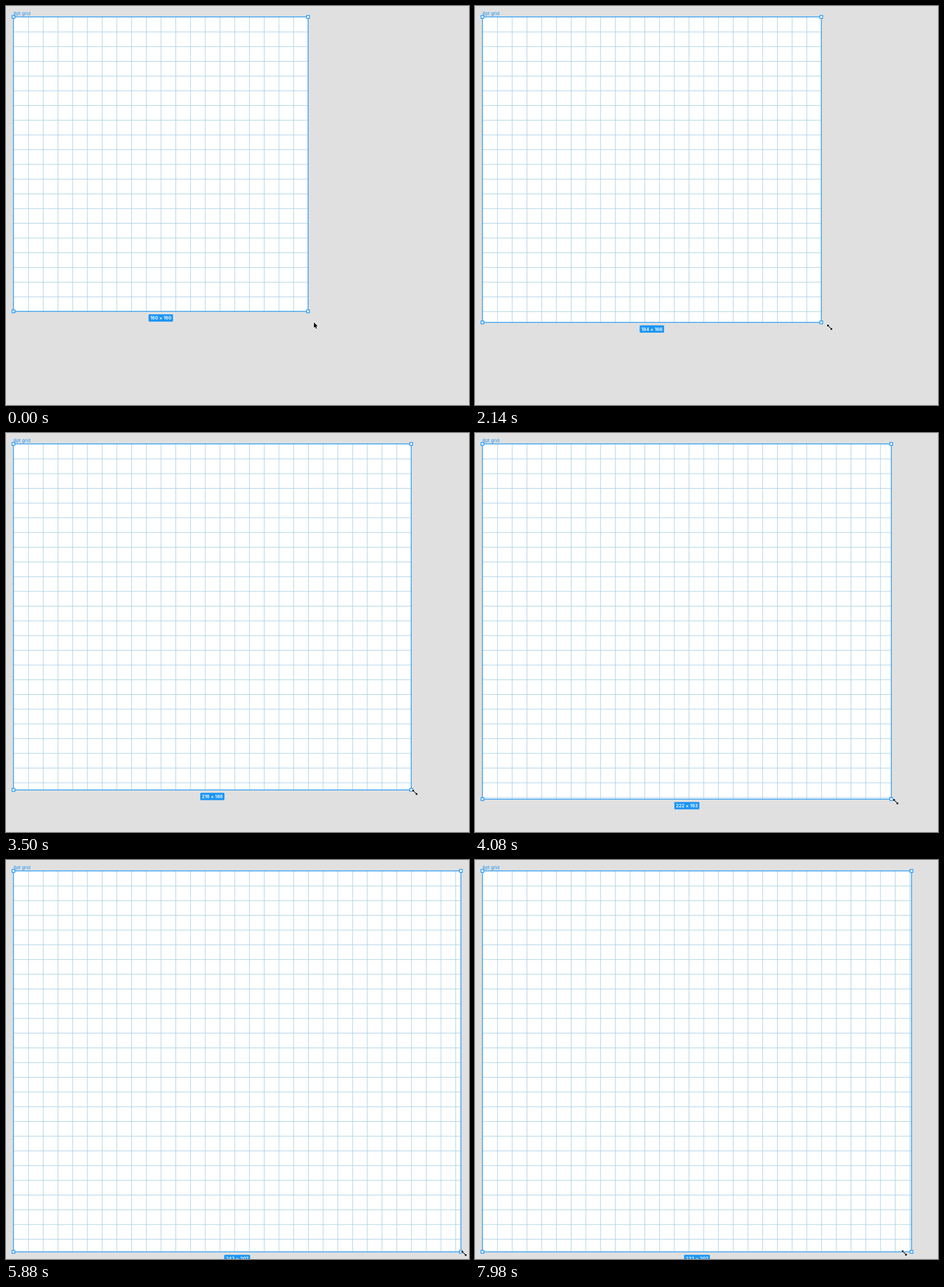
Recreate the animation shown at these times as an HTML page with a canvas. Size 806 px wide and 695 px high, loop 8 s.

```html
<!DOCTYPE html>
<html lang="en">
<head>
<meta charset="utf-8">
<title>Resizing a frame on an 8pt grid</title>
<style>
  html, body { margin: 0; width: 100%; height: 100%; overflow: hidden; background: #e0e0e0; }
  canvas { display: block; width: 806px; height: 695px; }
</style>
</head>
<body>
<canvas id="stage" width="806" height="695"></canvas>
<script>
const ctx = document.getElementById('stage').getContext('2d');
const LOOP = 8000, LEFT = 13, TOP = 19, SCALE = 3.2055, STEP = 8 * SCALE;
const LAG = 80; // the frame follows the pointer by this many ms
const BLUE = '#1b95f5';
const FONT = 'Inter, "Liberation Sans", sans-serif';

// time, frame width, frame height
const size = [
  [1620, 160, 160], [1840, 166, 161], [2140, 184, 166], [2280, 190, 169.5],
  [2840, 208, 184], [3500, 216, 188], [4760, 230, 199], [5880, 243, 207],
  [6300, 246, 208], [6800, 246, 208], [7460, 240, 207], [7980, 233, 207], [8060, 228, 207]
];

// time, pointer offset from its grip on the corner
const approach = [
  [20, 6.6, 17], [320, 1, 0], [460, 1, 0], [700, -1.5, 0], [860, -1.5, 0], [1020, 0, 0]
];

function sample(keys, t) {
  const next = keys.findIndex(key => key[0] > t);
  if (next === 0) return keys[0].slice(1);
  if (next < 0) return keys[keys.length - 1].slice(1);
  const a = keys[next - 1], b = keys[next];
  const k = (t - a[0]) / (b[0] - a[0]);
  return [1, 2].map(i => a[i] + (b[i] - a[i]) * k);
}

// The drag stalls for the last 100 ms of every 840 ms.
function stall(t) {
  const origin = t < 6720 ? 1540 : 6720;
  return t - Math.max(0, (t - origin) % 840 - 740);
}

const corner = ([w, h]) => [LEFT + w * SCALE, TOP + h * SCALE];

function drawGrid(right, bottom) {
  const w = right - LEFT, h = bottom - TOP;
  ctx.fillStyle = '#fff';
  ctx.fillRect(LEFT, TOP, w, h);
  ctx.fillStyle = '#a8d1e5';
  for (let y = TOP + STEP; y < bottom - 1; y += STEP) ctx.fillRect(LEFT, y, w, 1);
  for (let x = LEFT + STEP; x < right - 1; x += STEP) ctx.fillRect(x, TOP, 1, h);
}

function drawSelection(right, bottom) {
  ctx.strokeStyle = BLUE;
  ctx.lineWidth = 1.3;
  ctx.strokeRect(LEFT, TOP, right - LEFT, bottom - TOP);
  ctx.fillStyle = '#fff';
  for (const x of [LEFT, right]) {
    for (const y of [TOP, bottom]) {
      ctx.fillRect(x - 2.5, y - 2.5, 5, 5);
      ctx.strokeRect(x - 2.5, y - 2.5, 5, 5);
    }
  }
}

function drawText(text, x, y, color, weight, align) {
  ctx.font = `${weight} 8px ${FONT}`;
  ctx.fillStyle = color;
  ctx.textAlign = align;
  ctx.fillText(text, x, y);
}

function drawLabel(text, center, bottom) {
  ctx.font = `600 8px ${FONT}`;
  const w = ctx.measureText(text).width + 5.6;
  ctx.fillStyle = BLUE;
  ctx.beginPath();
  ctx.roundRect(center - w / 2, bottom + 5.1, w, 12.8, 1.6);
  ctx.fill();
  drawText(text, center, bottom + 14.4, '#fff', 600, 'center');
}

function drawPointer(points) {
  ctx.beginPath();
  points.forEach(([x, y]) => ctx.lineTo(x, y));
  ctx.closePath();
  ctx.lineWidth = 1.2;
  ctx.strokeStyle = '#fff';
  ctx.stroke();
  ctx.fillStyle = '#000';
  ctx.fill();
}

function drawArrow() {
  drawPointer([[0, 0], [0, 9.6], [2.1, 7.7], [3.7, 11.2], [5.3, 10.5], [3.8, 7.1], [6.6, 6.9]]);
}

function drawResize() {
  const half = [[-6.4, 0], [-3.3, -2.5], [-3.3, -.55], [3.3, -.55], [3.3, -2.5]];
  ctx.rotate(Math.PI / 4);
  drawPointer([...half, ...half.map(([x, y]) => [-x, -y])]);
}

function draw(time) {
  const t = stall(time);
  const [w, h] = sample(size, t).map(Math.round);
  const [right, bottom] = corner([w, h]);

  ctx.fillStyle = '#e0e0e0';
  ctx.fillRect(0, 0, 806, 695);
  drawGrid(right, bottom);
  drawText('8pt grid', LEFT, 16.2, BLUE, 400, 'left');
  drawSelection(right, bottom);
  drawLabel(`${w} × ${h}`, (LEFT + right) / 2, bottom);

  const [gripX, gripY] = corner(sample(size, t + LAG));
  const [dx, dy] = sample(approach, t);
  ctx.save();
  ctx.translate(gripX + 3.5 + dx, gripY + 2 + dy);
  if (t < 260) drawArrow(); else drawResize();
  ctx.restore();
}

const start = performance.now();
function tick() {
  draw((performance.now() - start) % LOOP);
  requestAnimationFrame(tick);
}
tick();
</script>
</body>
</html>
```
